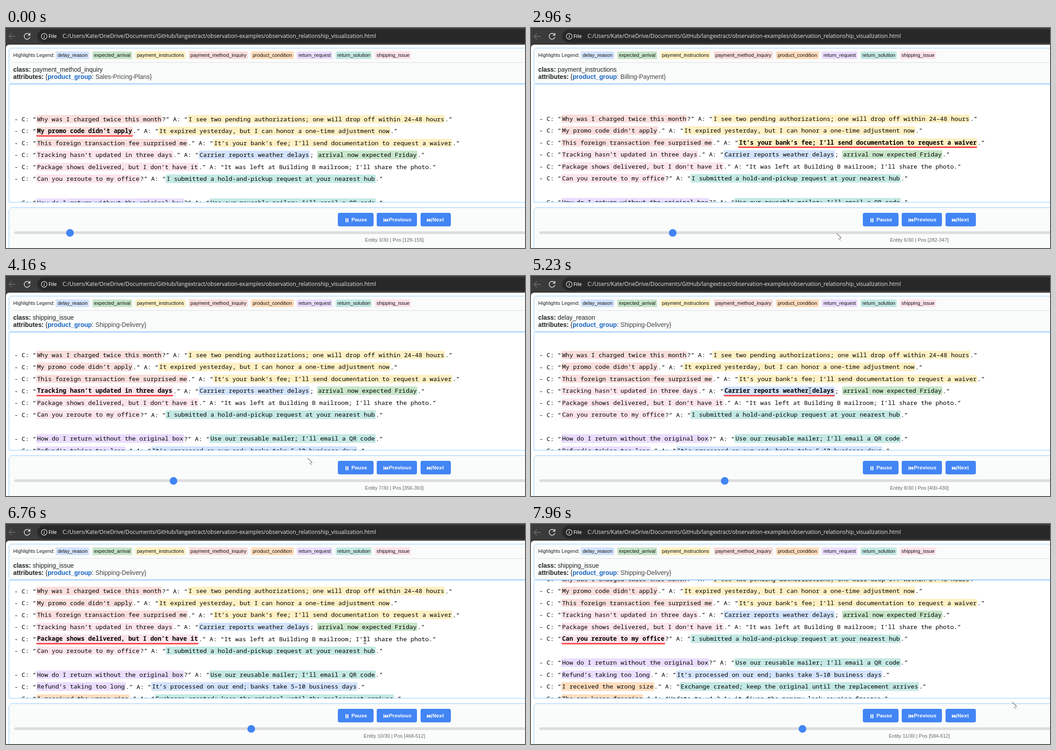
An HTML page that plays this animation: 1148 px wide and 488 px high, repeating every 8000 ms.

```html
<!DOCTYPE html>
<html lang="en">
<head>
<meta charset="utf-8">
<title>Entity highlights</title>
<style>
  html, body { margin: 0; width: 100%; height: 100%; overflow: hidden; background: #3b3b3b; }
  body { position: relative; font: 11.04px "Liberation Sans", Arial, sans-serif; color: #202124; }
  body * { box-sizing: border-box; }
  body > * { position: absolute; white-space: pre; }
  #address { left: 69px; top: 3px; width: 1200px; height: 30px; border-radius: 15px; background: #282828; }
  .bar { font-family: "Open Sans", "Noto Sans", sans-serif; color: #e9e9e9; top: 3px; line-height: 30px; }
  #page { left: 0; top: 37px; width: 1148px; height: 451px; border-radius: 7px 0 0 0; background: #fff; }
  .panel { left: 6px; width: 1200px; border: 1px solid #90caf9; background: #fafbfb; }
  #legend { left: 16px; top: 52px; line-height: 17px; display: flex; }
  #legend span { padding: 0 3.7px; margin-right: 6.7px; border-radius: 3px; color: #111; }
  #rule { left: 16px; top: 76px; width: 1132px; height: 1px; background: #ddd; }
  #info { left: 16px; top: 85px; font-size: 13.8px; line-height: 15.7px; }
  #info .key { color: #1565c0; }
  #info .value { color: #444; }
  #view { top: 124px; height: 263px; background: #fff; overflow: hidden; }
  #text { position: absolute; left: 11.4px; top: 0; color: #000;
          font: 13.48px/26.5px "Noto Sans Mono", "DejaVu Sans Mono", monospace; }
  #text span { padding: .4px 1.84px; border-radius: 3px; }
  #text .current { font-weight: bold; border-bottom: 3.7px solid #f44; }
  .button { top: 410px; height: 30px; border-radius: 4px; background: #4285f4; color: #fff;
            font-weight: bold; font-size: 11.8px; line-height: 31px; }
  #track { left: 18px; top: 451px; width: 1180px; height: 5.5px; border-radius: 3px; background: #ddd; }
  #thumb { left: 0; top: 445.5px; width: 17px; height: 17px; border-radius: 50%; background: #4285f4; }
  #status { left: 709px; width: 300px; top: 463px; line-height: 14px; text-align: center; color: #666; }
  svg { left: 0; top: 0; width: 1148px; height: 488px; fill: none; }
</style>
</head>
<body>
<div id="address"></div>
<div class="bar" style="left:94px;font-size:11px;font-weight:600">File</div>
<div class="bar" style="left:125px;font-size:12.12px">C:/Users/Kate/OneDrive/Documents/GitHub/langextract/observation-examples/observation_relationship_visualization.html</div>
<div id="page"></div>
<div class="panel" style="top:44px;height:80px;border-radius:7px"></div>
<div id="legend">Highlights Legend: </div>
<div id="rule"></div>
<div id="info"><b>class:</b> <span id="cls"></span>
<b>attributes:</b> {<b class="key">product_group</b><span class="value">: <span id="group"></span>}</span></div>
<div id="view" class="panel"><div id="text"></div></div>
<div class="panel" style="top:398px;height:120px;border-radius:7px"></div>
<div class="button" style="left:734px;width:79px;padding-left:30px">Pause</div>
<div class="button" style="left:820px;width:89px;padding-left:27px">Previous</div>
<div class="button" style="left:917px;width:67px;padding-left:26px">Next</div>
<div id="track"></div>
<div id="thumb"></div>
<div id="status"></div>
<svg viewBox="0 0 1148 488">
  <path d="M21 18.5H7M13 12l-6.500 6.500 6.500 6.500" stroke="#747474" stroke-width="1.400"/>
  <path d="M52.500 15.500a6.500 6.500 0 1 0 .5 4.500M53 11v5h-5" stroke="#e4e4e4" stroke-width="1.500"/>
  <circle cx="84.500" cy="18.500" r="6.300" stroke="#e4e4e4" stroke-width="1.200"/>
  <path d="M84.500 17.500v4.500M84.500 15v1.300" stroke="#e4e4e4" stroke-width="1.400"/>
  <path fill="#fff" d="M751 422h2.300v9h-2.300zM755 422h2.300v9h-2.300z
    M835 422h1.500v8.500h-1.500zM841 422v8.500l-4.500-4.250zM845.500 422v8.500l-4.500-4.250z
    M931 422v8.500l4.500-4.250zM935.500 422v8.500l4.500-4.250zM940 422h1.500v8.500h-1.500z"/>
  <path id="arrow" d="M0 0l10.500 9.500M4 11.500h1.500M7 9.500h1.500M5.500 13.500h1M7.500 12h1.500M8 15h1" stroke="#222"/>
  <path id="beam" d="M-3.500-6.500h3l.5.5.5-.5h3M0-6v12M-3.500 6.500h3l.5-.5.5.5h3" stroke="#333"/>
</svg>
<script>
const $ = id => document.getElementById(id);
const LOOP = 8000, TICK = 200 / 3;

const classes = [
  ['delay_reason', '#d2e3fc'], ['expected_arrival', '#c8e6c9'],
  ['payment_instructions', '#fef0c3'], ['payment_method_inquiry', '#f9dedc'],
  ['product_condition', '#ffddbe'], ['return_request', '#eaddff'],
  ['return_solution', '#c4e9e4'], ['shipping_issue', '#fce4ec'],
];

// {n…} marks an entity of class n
const transcript = `- C: “{3Why was I charged twice this month}?” A: “{2I see two pending authorizations; one will drop off within 24–48 hours}.”
- C: “{3My promo code didn’t apply}.” A: “{2It expired yesterday, but I can honor a one-time adjustment now}.”
- C: “{3This foreign transaction fee surprised me}.” A: “{2It’s your bank’s fee; I’ll send documentation to request a waiver}.”
- C: “{7Tracking hasn’t updated in three days}.” A: “{0Carrier reports weather delays}; {1arrival now expected Friday}.”
- C: “{7Package shows delivered, but I don’t have it}.” A: “It was left at Building B mailroom; I’ll share the photo.”
- C: “{7Can you reroute to my office}?” A: “{6I submitted a hold-and-pickup request at your nearest hub}.”

- C: “{5How do I return without the original box}?” A: “{6Use our reusable mailer; I’ll email a QR code}.”
- C: “{5Refund’s taking too long}.” A: “{0It’s processed on our end; banks take 5–10 business days}.”
- C: “{4I received the wrong size}.” A: “{6Exchange created; keep the original until the replacement arrives}.”
- C: “{4The app keeps freezing}.” A: “Update to v4.2.1; it fixes the memory leak causing freezes.”`;

// [time, centre of the first line]
const scrollSteps = [[0, 202.2], [1700, 201.2], [3700, 199.4], [3755, 175.3],
  [6690, 172], [6755, 148.8], [7700, 145.3], [7755, 122.2]];

// [time, x, y]
const pointerPath = [[780, 1003, 464], [840, 995, 458], [2500, 995, 458], [2695, 676, 456],
  [2900, 676, 456], [3090, 722, 456], [3970, 722, 456], [4500, 330, 88], [4760, 240, 95],
  [5220, 617, 254], [5360, 617, 254], [5760, 440, 98], [6095, 178, 90], [6300, 178, 90],
  [6620, 791, 258], [6750, 796, 260], [7170, 800, 262], [7650, 1086, 410], [7950, 1062, 394]];

function addSpan(parent, text, color) {
  const span = document.createElement('span');
  span.textContent = text;
  span.style.background = color;
  parent.append(span);
  return span;
}

for (const [name, color] of classes) addSpan($('legend'), name, color);

const entities = [];
let offset = 3;
transcript.split(/[{}]/).forEach((part, i) => {
  if (i % 2) {
    const [name, color] = classes[part[0]];
    part = part.slice(1);
    entities.push({ name, span: addSpan($('text'), part, color), from: offset, to: offset + part.length });
  } else {
    $('text').append(part);
  }
  offset += part.length;
});

function pointerAt(t) {
  const next = pointerPath.findIndex(p => p[0] > t);
  if (next === 0) return null;
  if (next < 0) return pointerPath.at(-1).slice(1);
  const [a, b] = [pointerPath[next - 1], pointerPath[next]];
  const k = (t - a[0]) / (b[0] - a[0]);
  const ease = k * k * (3 - 2 * k);
  return [a[1] + (b[1] - a[1]) * ease, a[2] + (b[2] - a[2]) * ease];
}

function placePointer(t) {
  const pos = pointerAt(t);
  const overText = pos && (pos[1] > 125 && pos[1] < 386 && pos[0] < 1000 || pos[1] > 85 && pos[1] < 118 && pos[0] < 330);
  for (const [id, visible] of [['arrow', pos && !overText], ['beam', overText]]) {
    $(id).style.display = visible ? '' : 'none';
    if (visible) $(id).setAttribute('transform', `translate(${pos.map(Math.round)})`);
  }
}

let shown = 0;
function showEntity(n) {
  if (n === shown) return;
  shown = n;
  const { name, from, to } = entities[n - 1];
  entities.forEach((e, i) => e.span.classList.toggle('current', i === n - 1));
  $('cls').textContent = name;
  $('group').textContent = n < 5 ? 'Sales-Pricing-Plans' : n < 7 ? 'Billing-Payment' : 'Shipping-Delivery';
  $('status').textContent = `Entity ${n}/30 | Pos [${from}-${to}]`;
  $('thumb').style.left = 141 + 57.4 * (n - 3) - 8.5 + 'px';
}

function draw(now) {
  const t = now % LOOP;
  showEntity(3 + Math.floor((t + 300) / 1000));
  const lineCentre = scrollSteps.findLast(s => s[0] <= t)[1];
  $('text').style.top = lineCentre - 13.25 - 125 + 'px';
  placePointer(Math.floor((t - 28) / TICK) * TICK + 28);
  requestAnimationFrame(draw);
}
draw(0);
</script>
</body>
</html>
```
